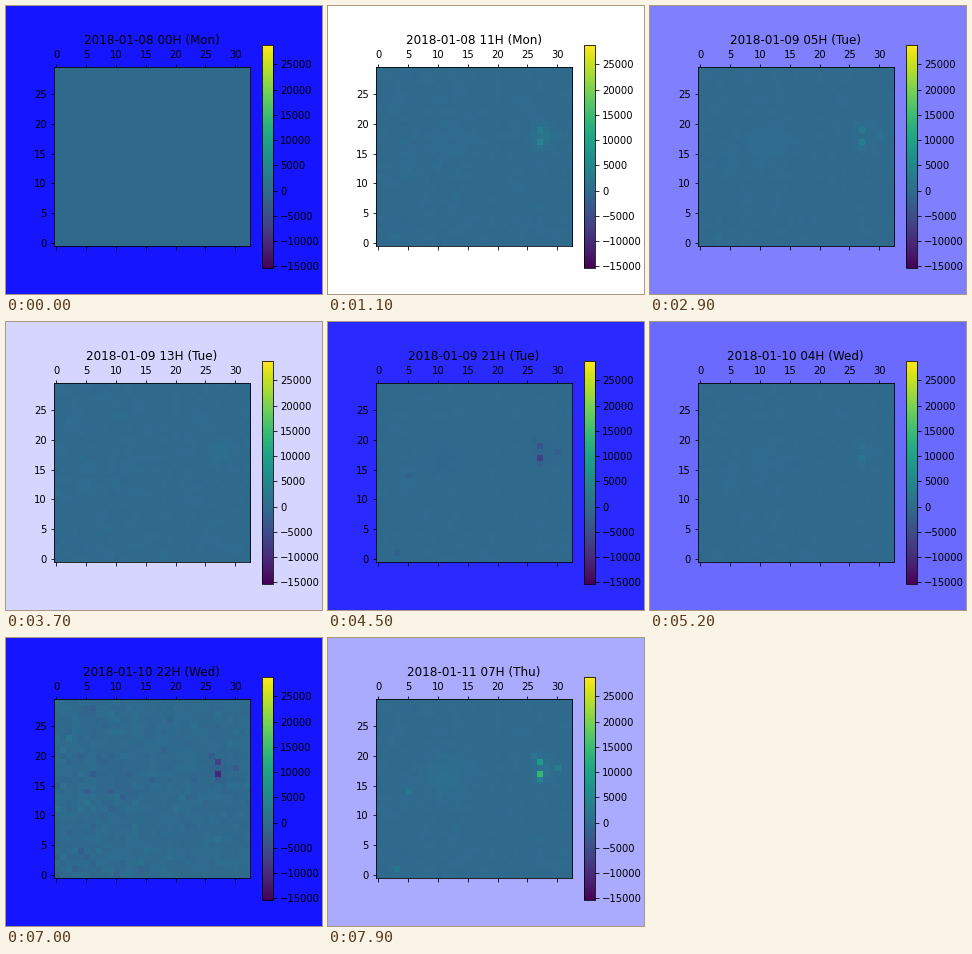
A matplotlib script for the animation above (8000 ms loop, 316 by 288 pixels).

```python
import numpy as np
import matplotlib.pyplot as plt
from matplotlib.animation import FuncAnimation
from matplotlib.patches import Rectangle

W, H, DPI = 316, 288, 72
COLS, ROWS = 33, 30
HOURS, STEP = 80, 100
VMIN, VMAX = -15327, 28871
DAYS = ["Mon", "Tue", "Wed", "Thu"]

# Share of the commuter flow at the busiest cells
HUBS = {(27, 17): 1, (27, 19): .65, (27, 16): .25, (26, 20): .15,
        (30, 18): .25, (5, 14): .15, (3, 1): .15}

rng = np.random.default_rng(8)
x, y = np.meshgrid(np.arange(COLS), np.arange(ROWS))


def bump(r, width):
    return np.exp(-(r / width) ** 2)


def blob(col, row, radius):
    return bump(np.hypot(x - col, y - row), radius)


center = blob(27.5, 18, 1.6)
flow = .12 * center + .06 * blob(11, 16.5, 3)
for (col, row), share in HUBS.items():
    flow[row, col] = share
grain = np.clip(rng.standard_t(3, (ROWS, COLS)), -6, 6)
grain *= .5 + .5 * bump(x - 5, 6)


def grid_at(hour):
    """Change per cell: morning inflow, midday plateau, evening outflow."""
    morning = 28800 * np.exp(-abs(hour - 8) / 1.4)
    midday = 1700 * bump(hour - 11, 2)
    evening = 15300 * bump(hour - 18.5, 2.7)
    late = bump(hour - 22.2, .6)
    noise = 100 * np.sin(np.pi * hour / 24) + 400 * late
    # Nothing moves at midnight
    settled = min(1, hour / 4)
    net = settled * morning - evening - 8000 * late
    return net * flow + midday * center + noise * grain


def place(left, top, width, height):
    """Axes placed in pixels from the top left corner."""
    return fig.add_axes([left / W, 1 - (top + height) / H,
                         width / W, height / H])


fig = plt.figure(figsize=(W / DPI, H / DPI), dpi=DPI)
sky = fig.add_artist(Rectangle((0, 0), 1, 1, lw=0, zorder=-10))

ax = place(47.52, 61.2, 196.416, 178.56)
image = ax.matshow(grid_at(0), origin="lower", aspect="auto",
                   cmap="viridis", vmin=VMIN, vmax=VMAX)
title = ax.set_title("")
fig.colorbar(image, cax=place(256.21, 38.88, 11.16, 223.2),
             ticks=range(-15000, 25001, 5000))


def update(i):
    day, hour = divmod(i, 24)
    light = 1 - abs(hour - 11) / 12
    sky.set_facecolor((light, light, 1))
    image.set_data(grid_at(hour))
    title.set_text(f"2018-01-{8 + day:02d} {hour:02d}H ({DAYS[day]})")
    return sky, image, title


anim = FuncAnimation(fig, update, frames=HOURS, interval=STEP,
                     repeat=True, repeat_delay=0, blit=False)
plt.show()
```
